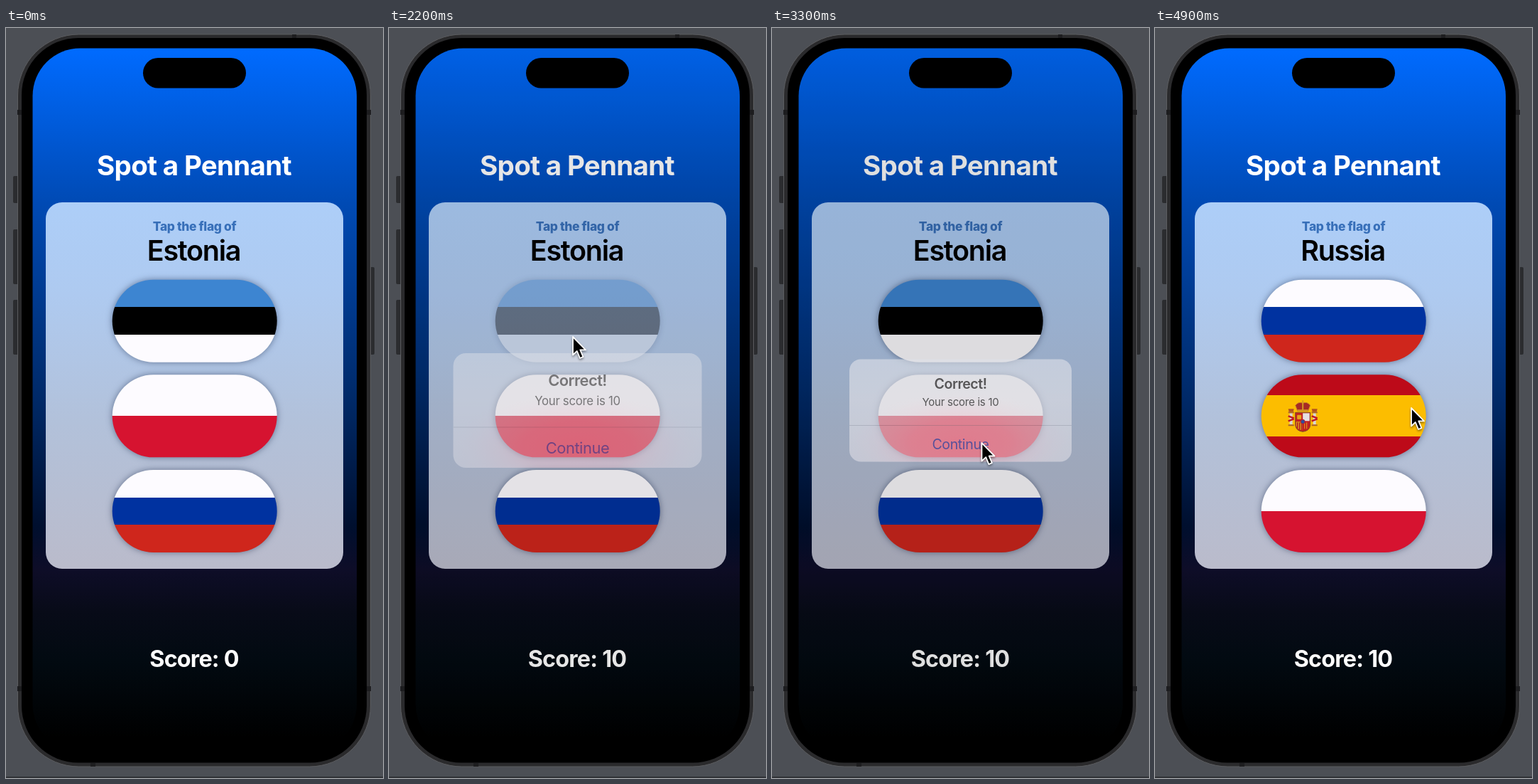
Animation, 531 px wide and 1054 px high, one loop 5000 ms. Source, as an HTML page:

```html
<!DOCTYPE html>
<html lang="en">
<head>
<meta charset="utf-8">
<title>Flag quiz</title>
<style>
html, body { margin: 0; width: 100%; height: 100%; overflow: hidden; background: #4c4f55; }
svg { display: block; width: 531px; height: 1054px; }
text { font-family: Inter, "Liberation Sans", sans-serif; text-anchor: middle; }
.title { font-size: 38.5px; font-weight: 700; letter-spacing: -.7px; fill: #fff; }
.hint { font-size: 17.4px; font-weight: 800; letter-spacing: -.35px; fill: #376fb9; }
.country { font-size: 39.5px; font-weight: 600; letter-spacing: -1.3px; }
.score { font-size: 32.3px; font-weight: 700; letter-spacing: -.8px; fill: #fff; }
.head { font-size: 19.6px; font-weight: 600; letter-spacing: -.5px; }
.note { font-size: 15px; letter-spacing: -.25px; }
.action { font-size: 19.6px; letter-spacing: -.4px; fill: #1a7ae2; }
.flag { filter: drop-shadow(0 0 5px rgba(20, 35, 70, .5)); }
#cursor { filter: drop-shadow(0 2px 1.5px rgba(0, 0, 0, .4)); }
</style>
</head>
<body>
<svg viewBox="0 0 531 1054">
  <defs>
    <linearGradient id="sky" x2="0" y2="1">
      <stop stop-color="#006bff"/>
      <stop offset=".22" stop-color="#004ab4"/>
      <stop offset=".5" stop-color="#002967"/>
      <stop offset=".68" stop-color="#000f2e"/>
      <stop offset=".74" stop-color="#0e0d28"/>
      <stop offset=".8" stop-color="#080b18"/>
      <stop offset=".87" stop-color="#020a11"/>
      <stop offset=".98" stop-color="#000"/>
    </linearGradient>
    <linearGradient id="glass" x2="0" y2="1">
      <stop stop-color="#adcef8"/>
      <stop offset=".25" stop-color="#aecaf0"/>
      <stop offset=".6" stop-color="#b2c1da"/>
      <stop offset="1" stop-color="#babbcb"/>
    </linearGradient>
    <linearGradient id="sheet" x2="0" y2="1">
      <stop stop-color="#dfe2e9"/>
      <stop offset=".4" stop-color="#e5e4ea"/>
      <stop offset="1" stop-color="#dddde5"/>
    </linearGradient>
    <radialGradient id="glow" cx=".5" cy=".82" r=".5">
      <stop stop-color="#f9c0cd"/>
      <stop offset=".45" stop-color="#f6c5d1" stop-opacity=".85"/>
      <stop offset="1" stop-color="#eedde4" stop-opacity="0"/>
    </radialGradient>
  </defs>

  <rect y="1052" width="531" height="2" fill="#303236"/>
  <g fill="#2b2c2f">
    <rect x="10" y="208" width="8" height="38" rx="2"/>
    <rect x="10" y="283" width="8" height="77" rx="2"/>
    <rect x="10" y="382" width="8" height="77" rx="2"/>
    <rect x="511" y="336" width="8" height="123" rx="2"/>
  </g>
  <rect x="16.5" y="9" width="497" height="1029" rx="86" fill="#2a2a2c" stroke="#5b5c5f"/>
  <path d="M16 115h6v7h-6zM508 115h6v7h-6zM16 925h6v7h-6zM508 925h6v7h-6zM403 9h6v5h-6zM119 1033h7v5h-7z" fill="#1d1d1f"/>
  <rect x="22" y="14" width="486" height="1018.500" rx="80"/>
  <rect x="37.500" y="28.500" width="456.500" height="989" rx="67" fill="url(#sky)"/>

  <text class="title" x="265" y="207">Spot a Pennant</text>
  <rect x="56" y="245" width="419" height="515" rx="23" fill="url(#glass)"/>
  <text class="hint" x="265.500" y="285">Tap the flag of</text>
  <text class="country" id="country" x="264.500" y="327"></text>
  <g id="flags"></g>
  <text class="score" id="score" x="265" y="898"></text>

  <rect id="dim" x="37" y="28" width="457.500" height="990" rx="67"/>
  <rect x="193" y="42" width="145" height="42.500" rx="21.250"/>

  <g id="alert">
    <rect x="109" y="465.500" width="313" height="144" rx="16" fill="url(#sheet)"/>
    <rect x="109" y="465.500" width="313" height="144" rx="16" fill="url(#glow)"/>
    <path d="M109 558.500H422" stroke="#b9b8c0"/>
    <text class="head" x="265.500" y="507">Correct!</text>
    <text class="note" x="265.500" y="530.500">Your score is 10</text>
    <text class="action" x="265.500" y="591.500">Continue</text>
  </g>
  <path id="cursor" d="M0 0V25.500L5.800 20 10 30 14.400 28.100 10.300 18.400H18Z" stroke="#fff" stroke-width="1.800" stroke-linejoin="round"/>
</svg>
<script>
const $ = id => document.getElementById(id);
const LOOP = 5000, STEP = 100;
const WHITE = '#fdfbff';
const bands = {
  estonia: ['#3d85d1', '#000', WHITE],
  poland: [WHITE, '#d61330'],
  russia: [WHITE, '#0032a0', '#cf261c'],
  spain: ['#bd0a19', '#fcbd00', '#fcbd00', '#bd0a19']
};
const rounds = [
  { country: 'Estonia', flags: ['estonia', 'poland', 'russia'] },
  { country: 'Russia', flags: ['russia', 'spain', 'poland'] }
];
// Cursor tip: time, x, y
const path = [
  [700, 330, 1090], [1400, 261, 436], [2200, 259, 434], [2400, 260, 436],
  [2800, 293, 573], [2900, 293, 574], [3600, 297, 589], [4200, 364, 532],
  [4300, 364, 532], [4900, 361, 534]
];

const clamp = v => Math.min(1, Math.max(0, v));
const ramp = (t, a, b) => clamp((t - a) / (b - a));
const smooth = u => u * u * (3 - 2 * u);
const easeOut = u => 1 - (1 - u) ** 2;

const pillar = x => `<path d="M${x} 62v16" stroke="#d9d5d2" stroke-width="4"/>
  <path d="M${x - 4} 61h8M${x - 4} 79h8" stroke="#a8622f" stroke-width="2"/>
  <path d="M${x - 4} 66l8 3M${x - 4} 73l8-3" stroke="#bd1525" stroke-width="2.500"/>
  <path d="M${x - 4} 56h8l-1 4h-6z" fill="#b3541e"/>`;

const arms = `<g transform="translate(0 -8)">${pillar(42)}${pillar(75)}
  <path d="M48 61H69V79Q68 87 58.500 88Q49 87 48 79Z" fill="#c32020" stroke="#7d4a2b"/>
  <path d="M58.500 62H68V73H58.500Z" fill="#e6dfe2"/>
  <path d="M51 65h5v5h-5zM61 75v9M64 75v9" fill="#e5a51b" stroke="#e5a51b"/>
  <path d="M49 74v5q1 6 9 7V74z" fill="#d99a1c"/>
  <path d="M51 75v8M54 75v10M57 75v11" stroke="#b51c24" stroke-width="1.500"/>
  <circle cx="58.500" cy="74" r="3" fill="#2d4f9e" stroke="#c32020"/>
  <path d="M51 59L48 51Q53 45 58.500 48Q64 45 69 51L66 59Z" fill="#a62a24" stroke="#c98a22"/>
  <path d="M51 58H66M58.500 44V57" stroke="#d39a25" stroke-width="2"/></g>`;

function flag(name, slot) {
  const list = bands[name], n = list.length;
  const stops = list.map((c, i) =>
    `<stop offset="${i / n}" stop-color="${c}"/><stop offset="${(i + 1) / n}" stop-color="${c}"/>`).join('');
  return `<g class="flag" transform="translate(149.700 ${353.700 + slot * 133.600})">
    <linearGradient id="${name}" x2="0" y2="1">${stops}</linearGradient>
    <rect width="232" height="116" rx="58" fill="url(#${name})"/>${name === 'spain' ? arms : ''}</g>`;
}

let shown = -1;
function showRound(i) {
  if (i === shown) return;
  shown = i;
  $('country').textContent = rounds[i].country;
  $('flags').innerHTML = rounds[i].flags.map(flag).join('');
}

function cursorAt(t) {
  const i = path.findIndex(p => p[0] > t);
  if (i < 0) return path[path.length - 1].slice(1);
  const [ta, xa, ya] = path[i - 1], [tb, xb, yb] = path[i];
  const u = smooth(ramp(t, ta, tb));
  return [xa + (xb - xa) * u, ya + (yb - ya) * u];
}

function draw(t) {
  showRound(t < 3700 ? 0 : 1);
  $('score').textContent = 'Score: ' + (t < 2100 ? 0 : 10);

  // The tapped flag fades while pressed, then recovers
  const pressed = t >= 2000 && t < 2500;
  $('flags').firstElementChild.style.opacity = pressed ? .2 + .8 * ramp(t, 2100, 2500) ** 1.0 : 1;

  const enter = easeOut(ramp(t, 2090, 2490));
  const leave = smooth(ramp(t, 3150, 3500));
  const shownness = enter * (1 - leave);
  const scale = 1.225 - .225 * enter;
  $('dim').setAttribute('opacity', .21 * shownness);
  $('alert').setAttribute('opacity', shownness);
  $('alert').setAttribute('transform',
    `translate(265.500 537.500) scale(${scale}) translate(-265.500 -537.500)`);

  const visible = t >= 800;
  $('cursor').style.display = visible ? '' : 'none';
  if (visible) $('cursor').setAttribute('transform', `translate(${cursorAt(t)})`);
}

const start = performance.now();
function tick() {
  const t = (performance.now() - start) % LOOP;
  draw(Math.floor(t / STEP) * STEP);
  requestAnimationFrame(tick);
}
tick();
</script>
</body>
</html>
```
